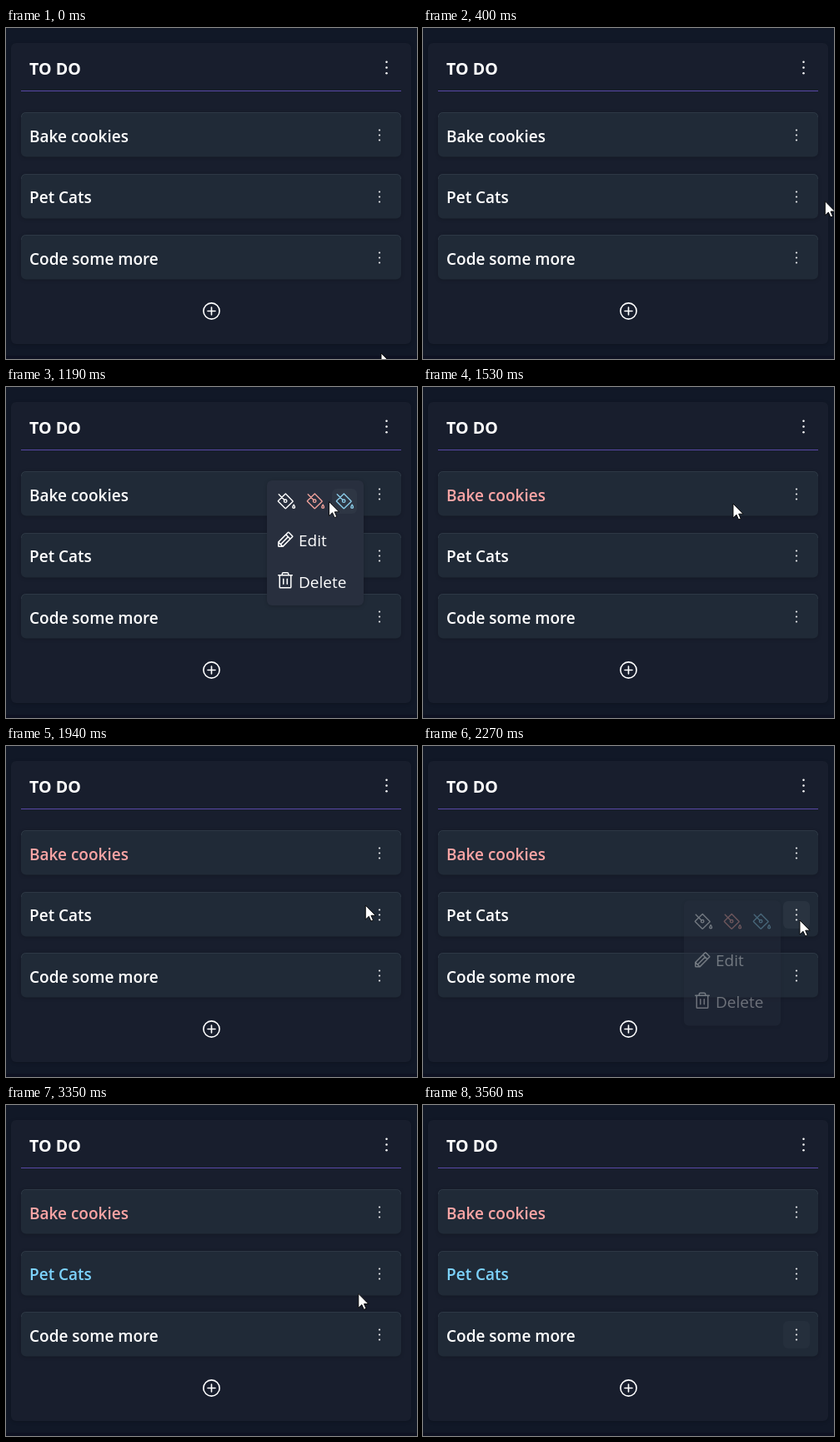
An HTML page for the animation above (4.22 s loop, 493 px wide and 397 px high).

```html
<!DOCTYPE html>
<html lang="en">
<head>
<meta charset="utf-8">
<title>To-do board</title>
<style>
  html, body { margin: 0; width: 100%; height: 100%; overflow: hidden; background: #111827; }
  svg { display: block; }
  text { font: 600 19px "Open Sans", "Noto Sans", sans-serif; fill: #fff; }
  .title { font-size: 19.6px; font-weight: 700; }
  #menu text { font-weight: 400; }
  .line { fill: none; stroke: #fff; stroke-width: 16; stroke-linejoin: round; stroke-linecap: round; }
  .soft { filter: drop-shadow(0 1px 2px #0003); }
  .cursor { fill: #fff; stroke: #000; stroke-width: .9; stroke-linejoin: round; }
</style>
</head>
<body>
<svg width="493" height="397" viewBox="0 0 493 397">
  <defs>
    <g id="dots" fill="#fff"><circle cy="-6" r="1.1"/><circle r="1.1"/><circle cy="6" r="1.1"/></g>
    <g id="bucket">
      <path d="M32 32 110 110M126 24 226 124Q231 129 226 134L130 227Q125 232 120 227L24 131Q19 126 24 121Z"/>
      <circle cx="124" cy="124" r="20"/>
      <path d="M240 176Q272 224 240 224T240 176Z"/>
    </g>
  </defs>

  <rect y="393" width="493" height="4" fill="#0e1222"/>
  <rect class="soft" x="6" y="18" width="480" height="361" rx="6" fill="#181e2d"/>
  <text class="title" x="28" y="56">TO DO</text>
  <use href="#dots" transform="translate(456.5 47.5) scale(1.12)"/>
  <path d="M18 75.5H474" stroke="#5848a5"/>
  <g id="cards"></g>
  <g class="line" style="stroke-width: 1.6">
    <circle cx="246.5" cy="339.5" r="9.6"/>
    <path d="M242 339.5H251M246.5 335V344"/>
  </g>

  <g id="menu">
    <rect class="soft" x="313" y="112" width="116" height="150" rx="6" fill="#282f3e"/>
    <g id="swatches"></g>
    <path class="line" transform="translate(323 171) scale(.094)" d="M93 216H48Q40 216 40 208V163Q40 160 42 158L162 38Q168 32 174 38L218 82Q224 88 218 94L98 214Q96 216 93 216ZM136 64 192 120M164 92 68 188M95 215 41 161"/>
    <path class="line" transform="translate(323 220.5) scale(.094)" d="M40 56H216M104 104V168M152 104V168M200 56V208Q200 216 192 216H64Q56 216 56 208V56M168 56V40Q168 24 152 24H104Q88 24 88 40V56"/>
    <text x="351" y="190.5">Edit</text>
    <text x="351" y="240.5">Delete</text>
  </g>

  <g id="pointer">
    <circle id="press" r="15" fill="#bdb816" fill-opacity=".75"/>
    <path id="arrow" class="cursor" d="M0 0V17L4 13.2 6.6 19 9.2 17.9 6.7 12.2H12Z"/>
    <path id="hand" class="cursor" d="M-.6 1.6Q1 -.4 2.6 1.6V7.5Q4 6.6 5.3 8.2 6.7 7.4 8 9.2 10.8 8.6 11.4 11V16.5L9.5 20V23H.8V20.5L-4 14Q-4.6 11.2 -2.4 11.7L-.6 13.6ZM2.6 7.5V11M5.3 8.2V11.5M8 9.2V12"/>
  </g>
</svg>
<script>
const LOOP = 4220, STEP = 67, GAP = 73.5, LEAVE = 53;
const $ = id => document.getElementById(id);
const show = (el, alpha) => el.setAttribute('opacity', +alpha);

// Each card's menu opens and closes at a step; closing recolours the label
const cards = [
  { label: 'Bake cookies', color: '#fca5a5', open: 12, close: 23 },
  { label: 'Pet Cats', color: '#7dd3fc', open: 34, close: 44 },
  { label: 'Code some more' }
];
const swatchColors = ['#fff', '#efa19b', '#8acbe8'];

// Pointer glides: first step, last step, destination, sideways bow
const start = [450, 390];
const glides = [
  { from: 0, to: 9.5, end: [457, 127], bow: 30 },
  { from: 14, to: 19.5, end: [372, 140] },
  { from: 24, to: 31.5, end: [452, 209] },
  { from: 34, to: 41, end: [415, 212] },
  { from: 49, to: 54, end: [490, 350] }
];

$('cards').innerHTML = cards.map(({ label }, i) => {
  const top = Math.round(101 + GAP * i);
  return `
    <rect class="soft" x="18" y="${top}" width="456" height="53.5" rx="6" fill="#202a37"/>
    <path d="M18.5 ${top + 6}q0 -5.5 5.5 -5.5h444q5.5 0 5.5 5.5" fill="none" stroke="#2d3845"/>
    <rect class="button" x="432" y="${top + 11}" width="32" height="33" rx="6" fill="#37414f"/>
    <use href="#dots" x="448" y="${top + 27.5}"/>
    <text class="label" x="28" y="${136.7 + GAP * i}">${label}</text>`;
}).join('');
$('swatches').innerHTML = swatchColors.map((color, i) => `
  <rect class="swatch" x="${321 + 35 * i}" y="122" width="30" height="30" rx="6" fill="#36404e"/>
  <use class="line" href="#bucket" style="stroke: ${color}"
    transform="translate(${324.5 + 35 * i} 126) scale(.086)"/>`).join('');
const labels = document.querySelectorAll('.label');
const buttons = document.querySelectorAll('.button');
const swatches = document.querySelectorAll('.swatch');

function pointerAt(n) {
  let [x, y] = start;
  for (const { from, to, end, bow = 0 } of glides) {
    const f = Math.min(1, Math.max(0, (n - from) / (to - from)));
    const e = f * f * (3 - 2 * f);
    x += (end[0] - x) * e + bow * Math.sin(Math.PI * f);
    y += (end[1] - y) * e;
  }
  return [x, y];
}

const openCard = n => cards.findIndex(c => n >= c.open && n < c.close);

function inside(n, rect, shift) {
  const [x, y] = pointerAt(n);
  const { x: left, y: top, width, height } = rect;
  const dx = x - left.baseVal.value, dy = y - top.baseVal.value - shift;
  return n < LEAVE && dx >= 0 && dx <= width.baseVal.value && dy >= 0 && dy <= height.baseVal.value;
}

// An open menu blocks the card buttons behind it
const overButton = (n, rect) => openCard(n) < 0 && inside(n, rect, 0);
const overSwatch = (n, rect) => openCard(n) >= 0 && inside(n, rect, GAP * openCard(n));

// Hover tint fades over the steps after the pointer leaves
const glow = (n, rect, over) => Math.max(...[1, .4, .2].map((a, ago) => a * over(n - ago, rect)));

function draw(now) {
  const n = Math.min(LEAVE, Math.floor((now % LOOP + 20) / STEP));

  buttons.forEach(rect => show(rect, glow(n, rect, overButton)));
  swatches.forEach(rect => show(rect, glow(n, rect, overSwatch)));
  cards.forEach((card, i) => labels[i].style.fill = n >= card.close ? card.color : '#fff');

  const card = openCard(n);
  show($('menu'), card < 0 ? 0 : Math.min(1, .37 * (n - cards[card].open + 1)));
  $('menu').setAttribute('transform', `translate(0 ${GAP * Math.max(0, card)})`);

  const hand = [...buttons].some(r => overButton(n, r)) || [...swatches].some(r => overSwatch(n, r));
  $('pointer').setAttribute('transform', `translate(${pointerAt(n)})`);
  show($('pointer'), n < LEAVE);
  show($('hand'), hand);
  show($('arrow'), !hand);
  show($('press'), cards.some(c => n === c.open - 1 || n === c.close - 1));

  requestAnimationFrame(draw);
}
requestAnimationFrame(draw);
</script>
</body>
</html>
```
